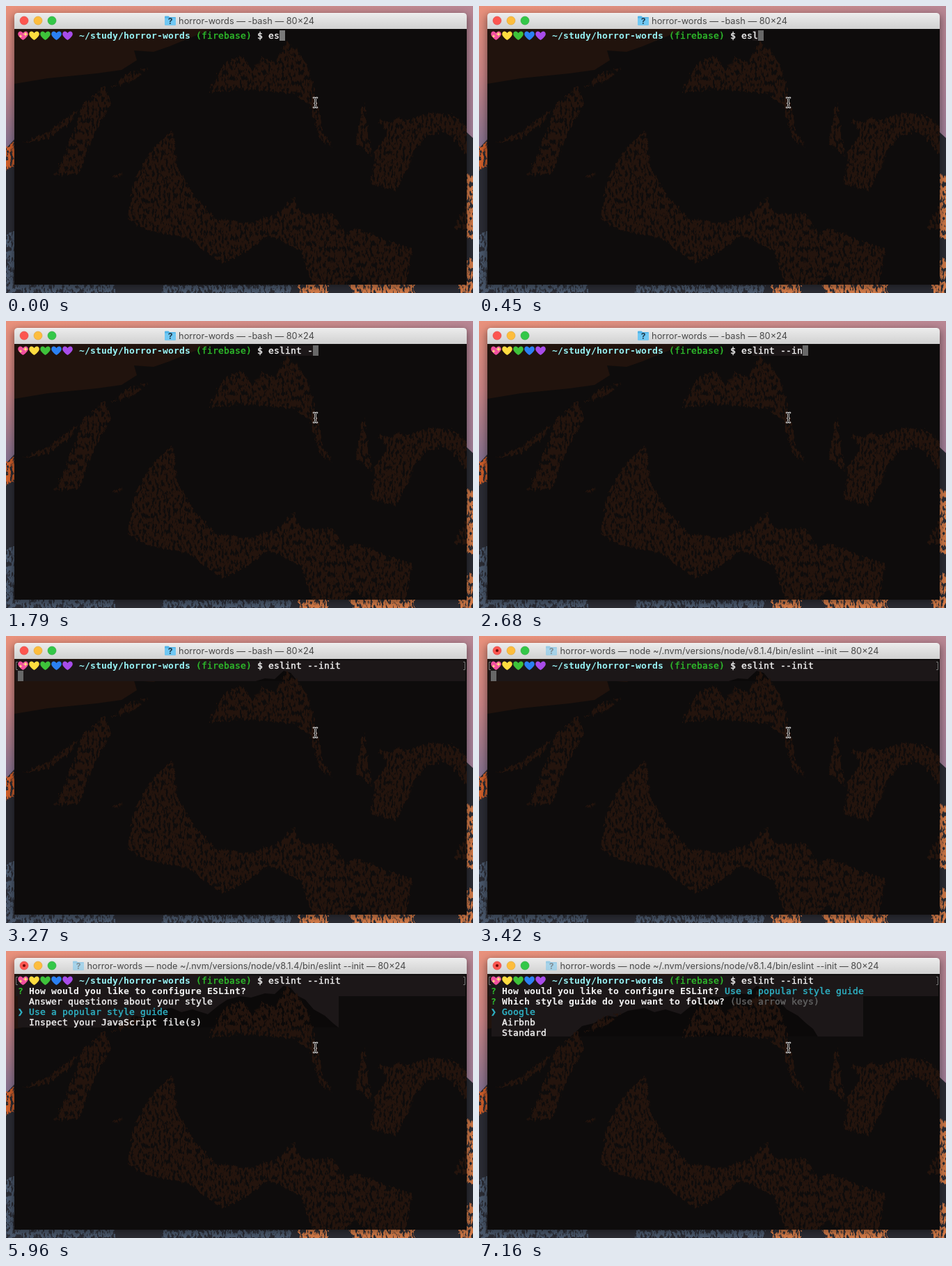
These frames come from a looping animation (671x413 px, 8 s). An HTML page:

```html
<!DOCTYPE html>
<html lang="en">
<head>
<meta charset="utf-8">
<title>Terminal</title>
<style>
html, body { margin: 0; width: 100%; height: 100%; overflow: hidden; background: #0e0c0c; }
svg { display: block; width: 671px; height: 413px; }
.term { font: 13px "DejaVu Sans Mono", monospace; letter-spacing: .174px; white-space: pre; }
.term .plain { stroke: currentColor; stroke-width: .4; }
.title { font: 12.75px Inter, sans-serif; fill: #484848; text-anchor: middle; white-space: pre; }
</style>
</head>
<body>
<svg viewBox="0 0 671 413" xmlns="http://www.w3.org/2000/svg">
  <defs>
    <linearGradient id="dusk" x2="0" y2="1">
      <stop stop-color="#e9917b"/><stop offset=".24" stop-color="#c88384"/><stop offset=".48" stop-color="#86718e"/>
    </linearGradient>
    <linearGradient id="haze">
      <stop offset=".1" stop-color="#a8839c" stop-opacity="0"/><stop offset="1" stop-color="#a8839c" stop-opacity=".75"/>
    </linearGradient>
    <linearGradient id="bar" x2="0" y2="1">
      <stop stop-color="#ececec"/><stop offset="1" stop-color="#d1d1d1"/>
    </linearGradient>
    <filter id="rough" filterUnits="userSpaceOnUse" x="0" y="0" width="671" height="413" color-interpolation-filters="sRGB">
      <feTurbulence type="fractalNoise" baseFrequency=".3 .13" numOctaves="3" seed="4" result="noise"/>
      <feDisplacementMap in="SourceGraphic" in2="noise" scale="9" xChannelSelector="R" yChannelSelector="G" result="shape"/>
      <feColorMatrix in="noise" values="0 0 0 0 0  0 0 0 0 0  0 0 0 0 0  0 0 7 0 -2.55"/>
      <feComposite in="shape" operator="in"/>
    </filter>
    <filter id="blur" x="-5%" y="-5%" width="110%" height="110%"><feGaussianBlur stdDeviation="6"/></filter>
    <clipPath id="patches"><rect id="rowPatch"/><rect id="listPatch"/></clipPath>
    <clipPath id="screen"><rect x="12" y="33" width="650" height="368"/></clipPath>
    <path id="heart" d="M0 6.5C-2 5.5-7.3 1.5-7.3-2.2C-7.3-6.8-1.8-7.4 0-3.4C1.8-7.4 7.3-6.8 7.3-2.2C7.3 1.5 2 5.5 0 6.5z"/>
    <path id="beam" d="M442 132Q444.5 132 444.5 134.5V143.500Q444.5 146 442 146M447 132Q444.5 132 444.5 134.5M447 146Q444.5 146 444.5 143.500M443.500 140H445.500"/>
  </defs>

  <!-- wallpaper -->
  <rect width="671" height="413" fill="url(#dusk)"/>
  <rect width="671" height="413" fill="url(#haze)"/>
  <path d="M0 205L12 192V413H0zM0 398H671V413H0zM660 180L671 190V413H660z" fill="#2b2c34"/>
  <g filter="url(#rough)">
    <path d="M0 325H14V413H0zM0 398H156V413H0zM225 402H410V413H225z" fill="#4a586c"/>
    <path d="M-2 208L14 193V230L-2 237z" fill="#d05f2a"/>
    <path d="M660 238L674 246V334H660zM660 364H674V392H660zM418 396H462V417H424zM492 396H586V417H500zM644 396H674V417H655z" fill="#d27a48"/>
  </g>
  <rect x="11" y="13" width="652" height="390" rx="5" opacity=".45" filter="url(#blur)"/>

  <!-- window -->
  <path d="M12 33V15Q12 10 17 10H657Q662 10 662 15V33z" fill="url(#bar)"/>
  <path d="M16 10.5H658" stroke="#f6f6f6"/>
  <rect x="12" y="33" width="650" height="368" fill="#0e0c0c"/>
  <g clip-path="url(#screen)">
    <path d="M12 32H300L264 46L235 58L212 66L184 64L188 78L166 92L130 97L60 104L12 112z" fill="#21130d"/>
    <g clip-path="url(#patches)">
      <rect x="12" y="33" width="650" height="100" fill="#1c1718"/>
      <path d="M130 125L148 108L165 104L184 93L196 95L214 86L238 82L252 88L268 84L290 91L306 78L318 70L336 65L352 67L372 61L386 62L399 50L409 53L418 64L430 70L442 84L458 93L470 104L480 112L488 125z" fill="#0b0909"/>
    </g>
    <g fill="#24140d" filter="url(#rough)">
      <path d="M142 116L112 138L100 172L84 214L70 244L106 240L119 202L130 178L151 140z"/>
      <path d="M24 198L62 180L104 148L94 166L62 190zM150 118L176 96L206 88L186 106zM150 246L168 238L164 247z"/>
      <path d="M291 124L312 84L338 70L352 92L368 74L386 82L403 50L418 64L433 84L443 122L456 182L468 202L453 194L436 142L412 126L352 120z"/>
      <path d="M240 178L214 202L186 246L174 306L202 322L262 334L286 352L312 370L350 350L376 330L396 338L424 352L440 402H488L500 386L520 402H574L584 350L548 338L502 318L488 330L470 298L446 300L422 298L414 274L388 300L350 312L300 306L270 272L246 232z"/>
      <path d="M514 138L502 198L526 216L520 180zM534 164L550 168L562 160L580 164L606 154L642 156L666 176V220L648 196L630 180L604 188L586 208L576 236L560 266L524 256L532 206L548 184z"/>
      <path d="M644 320L660 290H666V322z"/>
    </g>
  </g>

  <!-- title bar -->
  <circle cx="26" cy="21" r="6" fill="#fc5650" stroke="#df423d" stroke-width=".6"/>
  <circle cx="46" cy="21" r="6" fill="#fdbd3d" stroke="#dea032" stroke-width=".6"/>
  <circle cx="66" cy="21" r="6" fill="#34c748" stroke="#27a635" stroke-width=".6"/>
  <circle id="unsaved" cx="26" cy="21" r="2.1" fill="#6c0a08"/>
  <g id="folder">
    <path d="M0 1.5Q0 .5 1 .5H5.5L7 2H15Q16 2 16 3V12.5Q16 13.5 15 13.5H1Q0 13.5 0 12.5z" fill="#4fb3e8"/>
    <path d="M0 3.5H16V12.5Q16 13.5 15 13.5H1Q0 13.5 0 12.5z" fill="#70c8f3"/>
    <text x="8" y="12" text-anchor="middle" font-family="Inter, sans-serif" font-size="12" font-weight="700" fill="#1f3b4c">?</text>
  </g>
  <text id="title" class="title" y="25.6"></text>

  <!-- terminal -->
  <g id="hearts"></g>
  <path id="brackets" d="M17 37.5H14.5V48.5H17M657 37.5H659.5V48.5H657" fill="none" stroke="#777"/>
  <rect id="cursor" width="8" height="15"/>
  <g id="rows" class="term"></g>

  <!-- pointer -->
  <g fill="none" stroke-linecap="round">
    <use href="#beam" stroke="#e2e2e2" stroke-width="2.6"/>
    <use href="#beam" stroke="#111"/>
  </g>
</svg>
<script>
const LOOP = 8000, CELL = 8, LINE = 15, LEFT = 17, TOP = 35;
const COMMAND = 'eslint --init', COMMAND_COL = 45;
const KEY_TIMES = [450, 600, 1040, 1340, 1640, 1790, 1940, 2390, 2680, 2830, 2980];
const ENTER = 3270, RENAME = 3420, ASK = 4170, MOVE = 5960, CHOOSE = 7160;
const WHITE = '#f4f4f4', GREEN = '#2fc02c', CYAN = '#2fb5c8', GREY = '#636363', PATH = '#98f3f5';
const HEARTS = ['#f2509f', '#ffdc3f', '#3ec23a', '#2b80f2', '#a84cea'];
const STYLES = ['Answer questions about your style', 'Use a popular style guide', 'Inspect your JavaScript file(s)'];
const GUIDES = ['Google', 'Airbnb', 'Standard'];
const HINT = '(Use arrow keys)';

const $ = id => document.getElementById(id);
const set = (el, attrs) => { for (const k in attrs) el.setAttribute(k, attrs[k]); };
const show = (el, on) => el.setAttribute('visibility', on ? 'visible' : 'hidden');
const colX = col => LEFT + col * CELL;

function span(row, col, text, color = WHITE, bold = false) {
  const weight = bold ? 'font-weight="700"' : 'class="plain"';
  return `<text x="${colX(col)}" y="${TOP + 12 + row * LINE}" fill="${color}" color="${color}" ${weight}>${text}</text>`;
}

function question(row, text, tail, tailColor) {
  return span(row, 0, '?', GREEN, true) + span(row, 2, text, WHITE, true) +
    span(row, text.length + 3, tail, tailColor);
}

function list(row, items, active) {
  return items.map((item, i) => i === active
    ? span(row + i, 0, '❯', CYAN) + span(row + i, 2, item, CYAN)
    : span(row + i, 2, item)).join('');
}

function box(el, x1, y1, x2, y2) {
  set(el, { x: x1, y: y1, width: x2 - x1, height: y2 - y1 });
}

$('hearts').innerHTML = HEARTS.map((c, i) =>
  `<use href="#heart" x="${24.5 + 16 * i}" y="42.5" fill="${c}"/>`).join('') +
  '<path d="M28 37l1 2.5 2.5 1-2.5 1-1 2.5-1-2.5-2.5-1 2.5-1zM21 41l.8 1.7 1.7.8-1.7.8-.8 1.7-.8-1.7-1.7-.8 1.7-.8z" fill="#ffe27a"/>';

function draw(t) {
  const typed = 2 + KEY_TIMES.filter(k => t >= k).length;
  const cursorCol = COMMAND_COL + typed;
  const entered = t >= ENTER, renamed = t >= RENAME;

  let rows = span(0, 11, '~/study/horror-words', PATH, true) + span(0, 32, '(firebase)', GREEN) +
    span(0, 43, '$ ' + COMMAND.slice(0, typed));
  const first = 'How would you like to configure ESLint?';
  if (t >= CHOOSE) {
    rows += question(1, first, STYLES[1], CYAN) +
      question(2, 'Which style guide do you want to follow?', HINT, GREY) + list(3, GUIDES, 0);
  } else if (t >= ASK) {
    const moved = t >= MOVE;
    rows += question(1, first, moved ? '' : HINT, GREY) + list(2, STYLES, moved ? 1 : 0);
  }
  $('rows').innerHTML = rows;

  show($('cursor'), t < ASK);
  set($('cursor'), {
    x: entered ? LEFT : colX(cursorCol),
    y: entered ? TOP + LINE : TOP,
    fill: typed > 2 ? '#686868' : '#7a7a7a'
  });

  if (entered) box($('rowPatch'), 14, 35, 660, 65);
  else box($('rowPatch'), 393, 35, typed > 2 ? colX(cursorCol + 1) : 393, 50);
  if (t >= CHOOSE) box($('listPatch'), 18, 50, 552, 123);
  else box($('listPatch'), 17, 50, t >= ASK ? 478 : 17, 110);

  show($('brackets'), entered);
  show($('unsaved'), renamed);
  set($('folder'), { transform: `translate(${renamed ? 96 : 228} 14)`, opacity: renamed ? .5 : 1 });
  set($('title'), { x: 345.5 });
  $('title').textContent = 'horror-words — ' +
    (renamed ? 'node ~/.nvm/versions/node/v8.1.4/bin/eslint --init' : '-bash') + ' — 80×24';
}

const changes = [0, ...KEY_TIMES, ENTER, RENAME, ASK, MOVE, CHOOSE];
let drawn = -1;
function tick() {
  const t = performance.now() % LOOP;
  const step = changes.filter(c => t >= c).length;
  if (step !== drawn) {
    drawn = step;
    draw(t);
  }
  requestAnimationFrame(tick);
}
tick();
</script>
</body>
</html>
```
